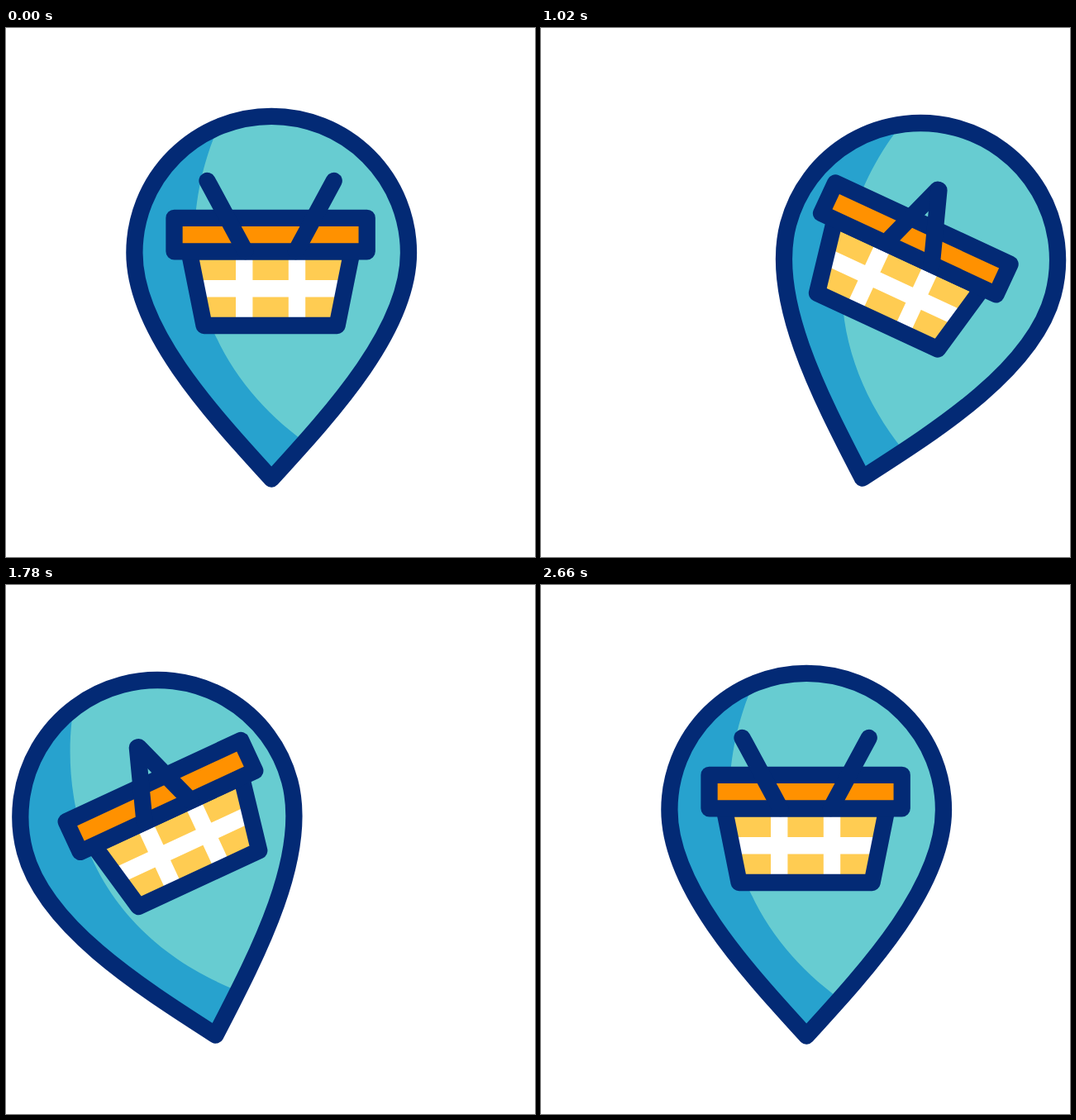
An HTML page for the animation above (2820 ms loop, 640 px wide and 640 px high).

```html
<!DOCTYPE html>
<html lang="en">
<head>
<meta charset="utf-8">
<title>Shopping pin</title>
<style>
  html, body { margin: 0; width: 100%; height: 100%; overflow: hidden; background: #fff; }
  svg { display: block; width: 100vw; height: 100vh; }
  .line { stroke: #032a75; stroke-width: 20.3; stroke-linecap: round; stroke-linejoin: round; }
</style>
</head>
<body>
<svg viewBox="0 0 640 640">
  <defs>
    <path id="drop" d="M321.2 545.5C245 462 155.4 364 155.4 272A165.8 165.2 0 0 1 487 272C487 364 397.4 462 321.2 545.5Z"/>
    <clipPath id="inDrop"><use href="#drop"/></clipPath>
    <path id="body" d="M221.6 270.3L239.6 360H400.6L418.6 270.3Z"/>
    <clipPath id="inBody"><use href="#body"/></clipPath>
  </defs>
  <g id="pin">
    <use href="#drop" fill="#67ccd1"/>
    <path clip-path="url(#inDrop)" fill="#27a2ce"
      d="M264 105C243 145 228 200 228 255C228 365 290 452 370 507L321 560H130V105Z"/>
    <use href="#drop" class="line" fill="none"/>
    <g id="basket">
      <use href="#body" fill="#ffcc52"/>
      <path clip-path="url(#inBody)" stroke="#fff" stroke-width="20.4" d="M288.2 270V360M352 270V360M220 315.2H420"/>
      <use href="#body" class="line" fill="none"/>
      <rect class="line" x="203.5" y="229.8" width="233.2" height="40.5" fill="#ff9100"/>
      <line id="left" class="line" x1="243.5" y1="185" x2="289.4" y2="270"/>
      <line id="right" class="line" x1="396.7" y1="185" x2="350.8" y2="270"/>
    </g>
  </g>
</svg>
<script>
  const LOOP = 2820;
  const MID = 320.1;
  const $ = id => document.getElementById(id);
  const pin = $('pin'), basket = $('basket'), left = $('left'), right = $('right');

  // [time, value] keys, eased in and out between neighbours
  const LEAN = [[200, 0], [1000, 1], [1800, -1], [2600, 0]];
  const SWING = [[400, 0], [1000, 1], [1800, -1], [2400, 0]];
  const OPEN = [[200, 1], [400, 0], [2400, 0], [2600, 1]];

  function sample(keys, t) {
    if (t <= keys[0][0]) return keys[0][1];
    for (let i = 1; i < keys.length; i++) {
      const [t0, a] = keys[i - 1], [t1, b] = keys[i];
      if (t < t1) {
        const x = (t - t0) / (t1 - t0);
        return a + (b - a) * x * x * (3 - 2 * x);
      }
    }
    return keys[keys.length - 1][1];
  }

  function draw(t) {
    const lean = sample(LEAN, t);
    const spread = 0.8 + 75.8 * sample(OPEN, t);
    pin.setAttribute('transform', `translate(${75.6 * lean} 0) rotate(${15 * lean} 321.2 515.5)`);
    basket.setAttribute('transform', `rotate(${10 * sample(SWING, t)} ${MID} 185)`);
    left.setAttribute('x1', MID - spread);
    right.setAttribute('x1', MID + spread);
  }

  let start;
  function tick(now) {
    start ??= now;
    draw((now - start) % LOOP);
    requestAnimationFrame(tick);
  }
  draw(0);
  requestAnimationFrame(tick);
</script>
</body>
</html>
```
